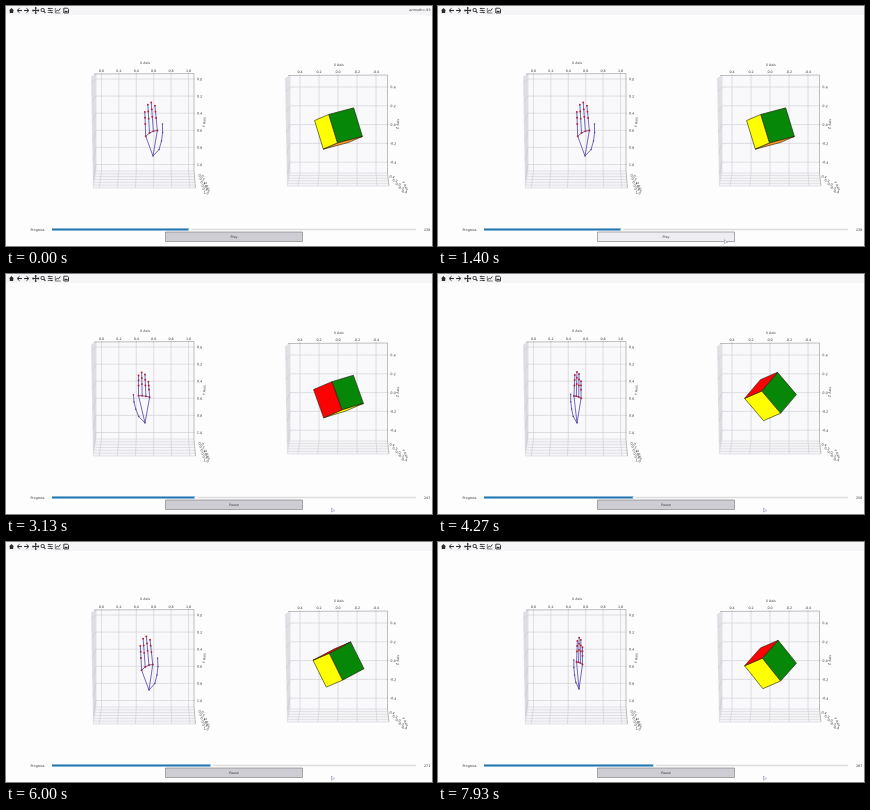
Write an HTML page with a canvas that moves like this. It is 426 px wide and 240 px high and loops after 8 s.

```html
<!DOCTYPE html>
<html lang="en">
<head>
<meta charset="utf-8">
<title>Hand tracking and cube rotation</title>
<style>
html, body { margin: 0; width: 100%; height: 100%; overflow: hidden; background: #fdfdfe; }
canvas { display: block; width: 426px; height: 240px; }
</style>
</head>
<body>
<canvas id="stage"></canvas>
<script>
const W = 426, H = 240, LOOP = 8000, START = 2050;
const canvas = document.getElementById('stage');
const ratio = window.devicePixelRatio || 1;
canvas.width = W * ratio;
canvas.height = H * ratio;
const ctx = canvas.getContext('2d');

const mix = (a, b, k) => a + (b - a) * k;
const mixPoint = (p, q, k) => [mix(p[0], q[0], k), mix(p[1], q[1], k)];
const clamp01 = k => Math.max(0, Math.min(1, k));
const series = (n, make) => Array.from({ length: n }, (_, i) => make(i));

function path(points, color, width, fill) {
  ctx.beginPath();
  points.forEach(p => ctx.lineTo(p[0], p[1]));
  if (fill) {
    ctx.closePath();
    ctx.fillStyle = fill;
    ctx.fill();
  }
  if (color) {
    ctx.strokeStyle = color;
    ctx.lineWidth = width;
    ctx.stroke();
  }
}

function dot(x, y, r, color) {
  ctx.beginPath();
  ctx.arc(x, y, r, 0, Math.PI * 2);
  ctx.fillStyle = color;
  ctx.fill();
}

function label(text, x, y, { align = 'center', turn = 0, size = 3.3 } = {}) {
  ctx.save();
  ctx.translate(x, y);
  ctx.rotate(turn);
  ctx.font = `${size}px "DejaVu Sans", sans-serif`;
  ctx.textAlign = align;
  ctx.textBaseline = 'middle';
  ctx.fillStyle = '#333';
  ctx.fillText(text, 0, 0);
  ctx.restore();
}

// roll and tilt turn the cube; turn, lean and the wrist place the hand.
const rest = { t: 0, roll: 13, tilt: .47, turn: 1, lean: -.065, x: 147, y: 150 };
const back = { t: 3130, roll: 103, tilt: .61, turn: -.92, lean: -.035, x: 139, y: 149 };
const keys = [
  rest,
  { ...rest, t: START },
  back,
  { t: 4270, roll: 40, tilt: .57, turn: -.6, lean: .02, x: 139, y: 149 },
  { t: 6000, roll: 23, tilt: .54, turn: .97, lean: -.08, x: 143, y: 148 },
  { ...back, t: 7200, x: 138, y: 148 },
  { t: 7930, roll: 38, tilt: .59, turn: -.5, lean: .02, x: 141, y: 147 }
];

// Slope at a key; zero at turning points so that the motion never overshoots.
function slope(k, name) {
  if (k === 0 || k === keys.length - 1) return 0;
  const rate = i => (keys[i + 1][name] - keys[i][name]) / (keys[i + 1].t - keys[i].t);
  const a = rate(k - 1), b = rate(k);
  return a * b > 0 ? 2 * a * b / (a + b) : 0;
}

function poseAt(t) {
  let k = 0;
  while (k < keys.length - 2 && t >= keys[k + 1].t) k++;
  const from = keys[k], to = keys[k + 1], span = to.t - from.t;
  const s = clamp01((t - from.t) / span);
  const ease = s * s * (3 - 2 * s);
  const pose = {};
  for (const name in from) {
    pose[name] = mix(from[name], to[name], ease) +
      span * s * (1 - s) * ((1 - s) * slope(k, name) - s * slope(k + 1, name));
  }
  return pose;
}

function axes(a) {
  const { x0, y0, x1, y1 } = a;
  const topLeft = [x0 - 4.5, y0 + 3.2], frontLeft = [x0 - 2.5, a.front];
  const frontRight = [x1 + 1.5, a.front];
  const light = '#d3d3da', grid = '#c9c9cd', edge = '#8c8c8c';

  path([[x0, y0], [x1, y0], [x1, y1], [x0, y1]], null, 0, '#f9f9fb');
  path([[x0, y0], [x0, y1], frontLeft, topLeft], null, 0, '#f1f1f4');
  path([[x0, y1], [x1, y1], frontRight, frontLeft], null, 0, '#f5f5f7');

  for (let i = 0; i <= a.rows; i++) {
    const s = i / a.rows;
    path([mixPoint([x0, y0], topLeft, s), mixPoint([x0, y1], frontLeft, s),
      mixPoint([x1, y1], frontRight, s)], light, .6);
  }
  a.ticks.forEach((text, i) => {
    const x = a.tickX + i * a.stepX, y = a.tickY + i * a.stepY;
    const u = (x - x0) / (x1 - x0), v = (y - y0) / (y1 - y0);
    path([[x, y0 - 1], [x, y1], mixPoint(frontLeft, frontRight, u)], grid, .55);
    path([[x1 + 1, y], [x0, y], mixPoint(topLeft, frontLeft, v)], grid, .55);
    label(text, x, y0 - 2.6);
    label(text, x1 + 5.5, y + .5, { turn: .1 });
    const p = mixPoint(a.depthFrom, a.depthTo, i / (a.ticks.length - 1));
    label(text, p[0], p[1], { turn: .25 });
  });
  path([[x0 - 2, y0 + .5], [x1, y0], [x1, y1], frontRight], edge, .55);
  label('X Axis', (x0 + x1) / 2, y0 - 10);
  label(a.sideTitle, x1 + 10.5, (y0 + y1) / 2, { turn: -Math.PI / 2 + .08 });
  label(a.depthTitle, a.depthTo[0] + 1, a.depthTo[1] - 6, { turn: 1.1 });
}

const handAxes = {
  x0: 90, y0: 67.5, x1: 188, y1: 165, front: 182, rows: 6,
  tickX: 95.5, stepX: 17.4, tickY: 73, stepY: 17.1,
  ticks: series(6, i => (i / 5).toFixed(1)),
  depthFrom: [195, 170], depthTo: [200, 187],
  sideTitle: 'Y Axis', depthTitle: 'Z Axis'
};
const cubeAxes = {
  x0: 284, y0: 69, x1: 381.5, y1: 167, front: 180, rows: 5,
  tickX: 294, stepX: 19, tickY: 81, stepY: 18.8,
  ticks: series(5, i => ((2 - i) / 5).toFixed(1)),
  depthFrom: [386, 171], depthTo: [398, 186],
  sideTitle: 'Z Axis', depthTitle: 'Y Axis'
};

function drawHand({ x, y, turn, lean }) {
  // side: distance towards the thumb; rise: height above the wrist.
  const at = (side, rise) => [x + side * turn + rise * lean, y - rise];
  const wrist = [x, y];
  const thumb = series(4, i => {
    const k = i / 3;
    return at(mix(6.5, 11.5, k) + 1.5 * Math.sin(k * Math.PI), mix(6.5, 30 + 2 * turn, k));
  });
  const fingers = series(4, f => {
    const knuckle = at(6 - 4 * f, 26.5 - turn - .4 * f * f * (1 + .6 * turn));
    const tip = at(5.2 - 3.5 * f, 52 + 1.5 * turn - 2.6 * (f - 1.1) ** 2);
    return [0, .5, .76, 1].map(k => mixPoint(knuckle, tip, k));
  });
  const ink = '#5044a8';
  [thumb, ...fingers, fingers.map(f => f[0])].forEach(line => path(line, ink, .8));
  [thumb, fingers[0], fingers[3]].forEach(f => path([wrist, f[0]], ink, .8));
  [wrist, ...thumb].forEach(p => dot(...p, .75, '#6a3690'));
  fingers.flat().forEach(p => dot(...p, .95, '#b32234'));
}

function drawCube({ roll, tilt }) {
  const half = 15, cx = 332.5, cy = 122.5;
  const gx = tilt, gy = -.43 * tilt;
  const gz = Math.sqrt(1 - gx * gx - gy * gy);
  const n = Math.sqrt(1 - gy * gy);
  const down = [-gy * gx / n, n, -gy * gz / n];
  const left = [gy * down[2] - gz * down[1], gz * down[0] - gx * down[2],
    gx * down[1] - gy * down[0]];
  const around = deg => {
    const r = deg * Math.PI / 180;
    return left.map((v, i) => v * Math.cos(r) + down[i] * Math.sin(r));
  };
  const green = [gx, gy, gz], yellow = around(roll), red = around(roll - 90);
  const face = (normal, a, b, sign, color) => {
    if (normal[2] * sign <= 0) return;
    const corner = (p, q) => [0, 1].map(i =>
      [cx, cy][i] + half * (normal[i] * sign + a[i] * p + b[i] * q));
    path([corner(-1, -1), corner(1, -1), corner(1, 1), corner(-1, 1), corner(-1, -1)],
      '#1c1c08', .6, color);
  };
  ctx.lineJoin = 'round';
  face(green, yellow, red, 1, '#078707');
  face(yellow, green, red, 1, '#ffff00');
  face(red, green, yellow, 1, '#fb0303');
  face(red, green, yellow, -1, '#ff9a28');
}

function drawToolbar(t) {
  const ink = '#2b2b2b', y = 4.5;
  ctx.fillStyle = '#f5f5f8';
  ctx.fillRect(0, 0, W, 9);
  // home, back, forward
  path([[3, y], [5.5, 2], [8, y], [7.2, y], [7.2, 7], [3.8, 7], [3.8, y]], null, 0, ink);
  [[13.5, -1], [20.5, 1]].forEach(([x, d]) => {
    path([[x - 2.4 * d, y], [x + 1.5 * d, y]], ink, 1.1);
    path([[x, 2.3], [x + 2.4 * d, y], [x, 6.7]], ink, 1);
  });
  // pan
  series(4, i => {
    const a = i * Math.PI / 2, p = [29.7 + 2.6 * Math.cos(a), y + 2.6 * Math.sin(a)];
    path([[29.7, y], p], ink, 1);
    dot(...p, .9, ink);
  });
  // zoom
  dot(36.6, 4, 2.1, ink);
  dot(36.6, 4, 1.2, '#f5f5f8');
  path([[37.8, 5.2], [39.4, 7]], ink, 1.1);
  // sliders
  series(3, i => {
    const row = 2.5 + 2 * i;
    path([[41.8, row], [46.8, row]], ink, .7);
    dot(43 + i * 1.3, row, .8, ink);
  });
  // chart, save
  path([[49.3, 2], [49.3, 7], [54.6, 7]], ink, .6);
  path([[49.8, 5.8], [51.3, 4], [52.4, 5], [54.4, 2.4]], ink, .9);
  path([[57.8, 2.2], [61.5, 2.2], [62.5, 3.2], [62.5, 7], [57.8, 7], [57.8, 2.2]], ink, .9);
  path([[58.6, 5.5], [61.6, 5.5]], ink, 1.3);
  if (t < 900) label('azimuth=-93', 424.5, 4, { align: 'right' });
}

function drawControls(t) {
  const run = Math.max(0, t - START) / 1000;
  const end = 184 + run * 5.55;
  label('Progress', 38.5, 223.7, { align: 'right' });
  path([[46, 223.5], [410, 223.5]], '#dcdcdc', 1.4);
  path([[46, 223.5], [end, 223.5]], '#1f77b4', 2);
  dot(end, 223.5, 1.6, '#fbfbfd');
  label(Math.floor(238 + run * 8.4), 418, 223.7, { align: 'left' });

  const hover = t > 1150 && t < 2350;
  ctx.fillStyle = hover ? '#ededf2' : '#cdcdd3';
  ctx.fillRect(159.5, 226, 137, 9.5);
  ctx.strokeStyle = '#777';
  ctx.lineWidth = .6;
  ctx.strokeRect(159.5, 226, 137, 9.5);
  label(t < START ? 'Play' : 'Pause', 228, 230.8);
}

function drawCursor(t) {
  if (t < 950) return;
  const enter = clamp01((t - 950) / 350);
  const leave = clamp01((t - 2200) / 400);
  const x = mix(mix(310, 286.5, enter), 325.5, leave);
  const y = mix(mix(240, 233.5, enter), 234, leave);
  path([[x, y], [x, y + 4.2], [x + 1.7, y + 3], [x + 3, y + 3], [x, y]], '#7c7ca4', .5, '#fff');
}

function draw() {
  const t = performance.now() % LOOP;
  const pose = poseAt(t);
  ctx.setTransform(ratio, 0, 0, ratio, 0, 0);
  ctx.fillStyle = '#fdfdfe';
  ctx.fillRect(0, 0, W, H);
  drawToolbar(t);
  axes(handAxes);
  axes(cubeAxes);
  drawHand(pose);
  drawCube(pose);
  drawControls(t);
  drawCursor(t);
  requestAnimationFrame(draw);
}
draw();
</script>
</body>
</html>
```
